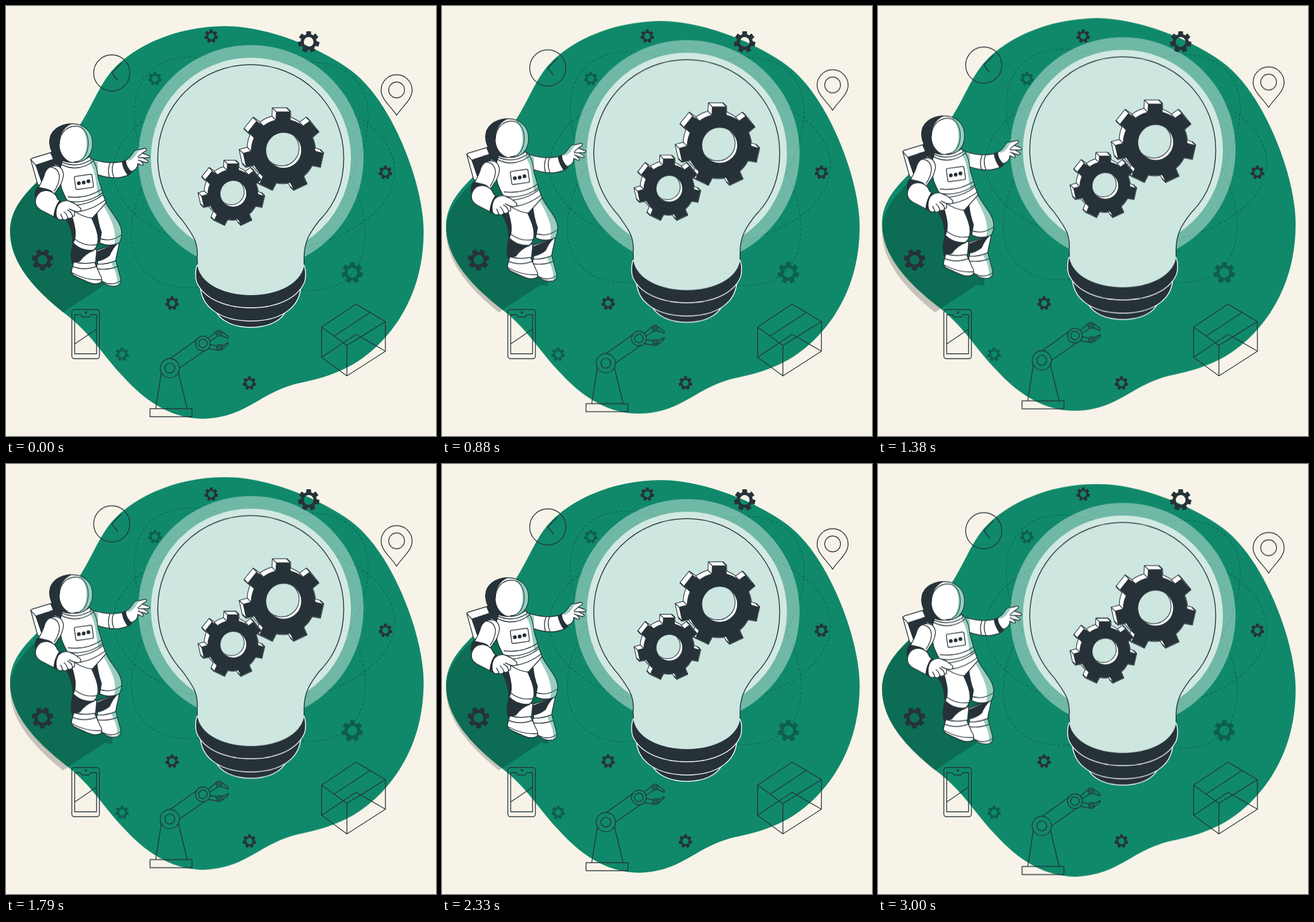
An HTML page for the animation above (3.04 s loop, 748 by 748 pixels).

```html
<!DOCTYPE html>
<html lang="en">
<head>
<meta charset="utf-8">
<title>Ideas in orbit</title>
<style>
  html, body { margin: 0; width: 100%; height: 100%; overflow: hidden; background: #f7f3e8; }
  svg { display: block; width: 100vw; height: 100vh; }
  .float { animation: float 3040ms linear infinite; }
  @keyframes float { 50% { transform: translateY(-15px); } }
  .line, .w, .d { stroke: #263238; stroke-width: 1.4; stroke-linejoin: round; stroke-linecap: round; }
  .line { fill: none; }
  .w { fill: #fff; }
  .d { fill: #263238; }
  .shade { fill: #10896a; opacity: .42; }
  .orbit { fill: none; stroke: #0b654e; stroke-width: 1.2; stroke-dasharray: 5 3.5; }
  .base { fill: #263238; stroke: #fff; stroke-width: 1.5; }
</style>
</head>
<body>
<svg viewBox="0 0 748 748">
  <g class="float">
    <path fill="#10896a" d="M380 35C300 35 220 68 180 118C160 143 147 180 125 212C105 245 75 285 47 313C25 335 7 360 7 392C7 450 55 498 105 537C150 572 170 610 205 646C245 690 290 718 342 718C420 716 440 672 510 656C570 644 618 625 662 574C700 530 726.500 470 726.500 392C726.500 310 672 165 600 112C545 72 455 35 380 35Z"/>
  </g>

  <path opacity=".2" d="M60 300L47 313C25 335 7 360 7 392C7 448 52 495 99 533L172 485L185 487V400L120 300Z"/>

  <g class="float">
    <ellipse class="orbit" cx="431.500" cy="287" rx="244.500" ry="141"/>
    <ellipse class="orbit" rx="248.600" ry="140.700" transform="translate(424 292) rotate(45.600)"/>
    <ellipse class="orbit" rx="247.600" ry="139.800" transform="translate(424 294) rotate(-42.200)"/>

    <!-- bulb -->
    <circle cx="426" cy="264" r="196" fill="#fff" opacity=".4"/>
    <circle cx="426" cy="264" r="174" fill="#d2e9e2"/>
    <path class="base" d="M364 528C372 549 398 559 426 559C454 559 480 549 488 528Z"/>
    <path class="base" d="M338 484C338 526 376 548 426 548C476 548 513 526 513 484Z"/>
    <path class="base" d="M333 450C329 458 329 473 332 481C345 510 383 525 426 525C469 525 506 510 519 481C522 473 522 458 518 450Z"/>
    <path fill="#cde6e0" d="M333 430V452C339 484 380 503 426 503C472 503 512 484 518.500 452V430L519 380H333Z"/>
    <path fill="#cde6e0" stroke="#263238" stroke-width="1.5" d="M333 450L332.500 438C335 411 325 398 307 373C286 350 264 316 264 263.700A161.750 161.750 0 0 1 587.500 263.700C587.500 314 569 349 545 373C527 396 519 411 518.500 436L518.500 450"/>

    <g id="cogs"></g>

    <!-- clock and pin -->
    <circle class="line" cx="184" cy="116.500" r="31.500"/>
    <path class="line" d="M201 99L184 116.500L194 129"/>
    <path class="line" d="M679.500 190C669 174 652.500 162 652.500 146.500A27 27 0 0 1 706.500 146.500C706.500 162 690 174 679.500 190Z"/>
    <circle class="line" cx="679.500" cy="146" r="13.700"/>

    <!-- robot arm -->
    <g class="line">
      <path d="M250.500 700.500H323.500V714.500H250.500ZM260.500 700L270 639M315 700L300 638"/>
      <circle cx="285" cy="630" r="16.800"/><circle cx="285" cy="630" r="8.600"/>
      <circle cx="342.500" cy="587" r="12.800"/><circle cx="342.500" cy="587" r="7.500"/>
      <path d="M286 613L332 580M303 629L345 600M352 578L366 566M355 583L369 574M355 589L366 591M352 596L369 599"/>
      <circle cx="370.500" cy="569" r="5.200"/><circle cx="370.500" cy="569" r="2.400"/>
      <circle cx="371.500" cy="594" r="5.200"/><circle cx="371.500" cy="594" r="2.400"/>
      <path d="M375 566L387 575L386 578L374 573M376 591L387 585.500L386 589L375 598"/>
    </g>

    <!-- backpack -->
    <path class="w" d="M43 267Q44 265 48 264L78 255L98 285L66 316L55 310Z"/>
    <path class="d" d="M52 277L82 267L98 262V280L85 275L68 310L62 306Z"/>
    <path class="d" d="M78 256L84 246L100 262L98 280L85 272Z"/>
    <path class="line" d="M43 267L52 277L82 267"/>

    <!-- far arm -->
    <path class="w" d="M148 266C160 270 178 274 194 272L207 270L215 293C200 300 185 302 158 293Z"/>
    <path class="shade" d="M150 266L160 272C160 284 160 290 158 293L150 290Z"/>
    <path class="line" d="M187 273Q182 285 188 299M181 273Q176 285 180 298"/>
    <path class="d" d="M202 271Q204 284 212 294L219 290Q209 282 208 268Z"/>
    <path class="w" d="M208 269C214 265 218 261 222 254Q226 249 232 250L240 248Q246 247 244 251L237 256L248 260Q253 263 247 264L238 264L246 269Q250 273 243 272L235 270L239 275Q239 279 234 276L229 274C230 281 224 286 218 288Q209 281 208 269Z"/>
    <path class="shade" d="M222 254Q226 249 232 250L224 262Q217 270 211 269Z"/>
    <path class="line" d="M237 256L230 262M238 264L230 264M235 270L230 268"/>

    <!-- legs -->
    <path class="w" d="M158 425L197 411C195 428 189 440 191 450L160 456Z"/>
    <path class="d" d="M158 428L194 413Q186 420 180 434Q170 442 158 444Z"/>
    <path class="w" d="M150 366L174 342C182 360 199 374 201 392Q202 404 197 412Q180 420 163 412C159 396 154 382 150 366Z"/>
    <path class="d" d="M148 366L158 358Q160 378 166 394L163 412Z"/>
    <path class="line" d="M162 404Q182 412 201 398"/>
    <path class="shade" d="M174 343C182 360 199 374 201 392Q202 404 197 412L188 415C194 394 184 372 170 348Z"/>
    <path class="w" d="M158 449Q174 450 191 443L199 473Q202 484 193 487Q180 489 171 482Q158 472 158 449Z"/>
    <path class="line" d="M158 457Q176 460 194 453M170 480Q184 488 199 478"/>
    <path class="shade" d="M183 447L191 443L199 473Q202 484 193 487Q196 470 183 447Z"/>

    <path class="w" d="M117 415L158 424L155 452L118 448Z"/>
    <path class="d" d="M116 415L153 425Q138 430 128 444L115 447Q111 435 116 415Z"/>
    <path class="d" d="M104 358L122 360L124 398L116 413Q117 390 104 370Z"/>
    <path class="w" d="M112 354L146 362C154 380 161 394 160 408Q158 422 151 425Q130 426 117 412C126 395 116 374 112 354Z"/>
    <path class="line" d="M119 405Q136 419 159 415"/>
    <path class="w" d="M118 445Q135 450 154 446L163 466Q169 476 165 481Q155 486 142 480L122 471Q113 467 114 460Z"/>
    <path class="line" d="M116 453Q136 461 157 453M115 464Q140 478 166 476"/>

    <!-- torso -->
    <path class="w" d="M115 345L168 326L174 342Q164 354 150 369Q132 367 116 355Z"/>
    <path class="line" d="M130 357Q152 353 172 338"/>
    <path class="w" d="M98 271Q125 283 148 264C157 272 159 286 160 298L169 328Q146 346 115 347Q106 342 97 318Q90 291 98 271Z"/>
    <path class="shade" d="M148 264C157 272 159 286 160 298L169 328L161 333C156 310 157 286 144 269Z"/>
    <path class="line" d="M97 276Q125 290 152 270M108 332Q140 336 166 319M112 340Q142 344 168 325"/>
    <g transform="rotate(-8 135.500 306)">
      <rect class="w" x="120" y="294.500" width="31" height="23" rx="2.500"/>
      <circle class="d" cx="126.500" cy="307" r="2.600"/>
      <circle class="d" cx="135" cy="307" r="2.600"/>
      <circle class="d" cx="143.500" cy="306" r="2.600"/>
    </g>

    <!-- near arm -->
    <path class="w" d="M66 296Q70 278 86 278Q99 279 100 294Q98 309 90 318Q84 331 72 330L55 318Q61 309 66 296Z"/>
    <path class="line" d="M74 280Q92 280 93 298Q92 310 84 322"/>
    <path class="d" d="M55 315L72 319Q82 322 84 329L60 340L51 332Q50 321 55 315Z"/>
    <path class="w" d="M53 332Q60 318 76 322Q86 325 90 336L100 344L90 370L61 355Q47 347 53 332Z"/>
    <path class="d" d="M93 339L100 343L92 370L83 367Q85 349 93 339Z"/>
    <path class="w" d="M91 345Q99 337 109 339L120 344L129 351Q133 356 126 358L119 357Q121 366 116 366Q113 371 108 369Q103 374 99 371Q92 374 88 367Q85 356 91 345Z"/>
    <path class="line" d="M119 357L110 353M116 366Q114 358 107 355M108 369Q105 361 101 358M99 371Q97 365 95 362"/>

    <!-- head -->
    <path class="w" d="M97 264Q121 279 146 262L148 267Q125 283 98 272Z"/>
    <path class="w" d="M113 205C137 204 151 220 150.500 240C150 260 138 272 120 272C96 273 76 259 76 236C76 218 92 206 113 205Z"/>
    <path class="d" d="M113 205C101 210 91 224 92.500 243C94 260 104 269 113 272C92 271 76 258 76 236C76 218 92 206 113 205Z"/>
    <path class="line" d="M93 240C93 222 105 209 121 209C136 209 144 224 143 242C142 259 133 271 119 271"/>
    <path class="shade" d="M127 207C143 211 151 224 150.500 240C150 258 140 269 127 271C142 261 147 225 127 207Z"/>
  </g>

  <g id="static-cogs"></g>

  <!-- phone and parcel -->
  <g class="line">
    <rect x="114.500" y="528" width="48" height="85.500" rx="4.500"/>
    <path d="M119.500 537H130L132 541H145L147 537H157.500V605H119.500ZM119.500 588L157.500 562"/>
    <circle class="d" cx="139" cy="533" r="1.300"/>
    <path d="M609 518.500L660 549L593 590.500L549 558.500ZM549 558.500V611L593 643.500V590.500M660 549V600.500L593 643.500M549 611L609 571L660 600.500M571 574L633 533.500"/>
  </g>
</svg>

<script>
  const svgNS = 'http://www.w3.org/2000/svg';
  const dark = '#263238';
  const dim = '#0d5f4b';

  function add(parent, tag, attrs) {
    const node = document.createElementNS(svgNS, tag);
    for (const key in attrs) node.setAttribute(key, attrs[key]);
    return parent.appendChild(node);
  }

  // Tooth corners, clockwise from the top tooth: root, tip, tip, root.
  function teeth(tip, body, half, turn = 0) {
    const base = Math.sqrt(body * body - half * half);
    return Array.from({ length: 7 }, (_, i) => {
      const a = (i / 7) * 2 * Math.PI - Math.PI / 2 + turn;
      const c = Math.cos(a), s = Math.sin(a);
      return [[base, -1], [tip, -.95], [tip, .95], [base, 1]]
        .map(([r, k]) => [r * c - k * half * s, r * s + k * half * c]);
    });
  }

  function outline(list, body) {
    return list.map((t, i) =>
      `${i ? `A${body} ${body} 0 0 1 ` : 'M'}${t.join('L')}`).join('') +
      `A${body} ${body} 0 0 1 ${list[0][0]}Z`;
  }

  const ring = (x, y, r) =>
    `M${x - r} ${y}a${r} ${r} 0 1 0 ${2 * r} 0a${r} ${r} 0 1 0 ${-2 * r} 0Z`;

  function thickCog(id, x, y, tip, body, half, hole, depth) {
    const g = add(document.getElementById('cogs'), 'g', { transform: `translate(${x} ${y})` });
    const list = teeth(tip, body, half);
    const d = outline(list, body);
    const layers = [
      { fill: dark, stroke: dark, 'stroke-width': 2.4 },
      { fill: '#fff' }
    ];
    for (const paint of layers) {
      for (let k = 1; k >= 0; k -= .125) {
        add(g, 'path', { d, transform: `translate(${-depth * k} ${-depth * k})`, ...paint });
      }
    }
    const edges = list.flat().map(([px, py]) => `M${px} ${py}l${-depth} ${-depth}`).join('');
    add(g, 'path', { d: edges, class: 'line' });

    const clip = add(g, 'clipPath', { id });
    add(clip, 'circle', { cx: 1, cy: -1.5, r: hole });
    const inner = add(g, 'g', { 'clip-path': `url(#${id})` });
    add(inner, 'circle', { cx: 1, cy: -1.5, r: hole, fill: '#fff' });
    add(inner, 'circle', {
      cx: -2.6, cy: -4.8, r: hole, fill: '#cde6e0', stroke: dark, 'stroke-width': 1.2
    });
    add(g, 'path', { d: d + ring(1, -1.5, hole), fill: dark, 'fill-rule': 'evenodd' });
  }

  thickCog('holeA', 482, 252.5, 69, 56, 13, 30.5, 5.8);
  thickCog('holeB', 394.5, 328, 54, 44, 10.5, 22.5, 5);

  function flatCog(x, y, r, fill, turn) {
    const body = r * .75;
    add(document.getElementById('static-cogs'), 'path', {
      d: outline(teeth(r, body, r * .23, turn), body) + ring(0, 0, r * .46),
      transform: `translate(${x} ${y})`, fill, 'fill-rule': 'evenodd'
    });
  }

  const flat = [
    [357, 52.5, 11.7, dark], [526.5, 62.5, 18.5, dark], [259, 126.5, 11.7, dim],
    [660, 289.5, 11.7, dark], [63.5, 441.5, 18.5, dark, Math.PI / 7], [602.5, 464, 18.5, dim],
    [289, 517, 11.7, dark], [202, 606, 11.7, dim], [423.5, 656, 11.7, dark]
  ];
  for (const cog of flat) flatCog(...cog);
</script>
</body>
</html>
```
